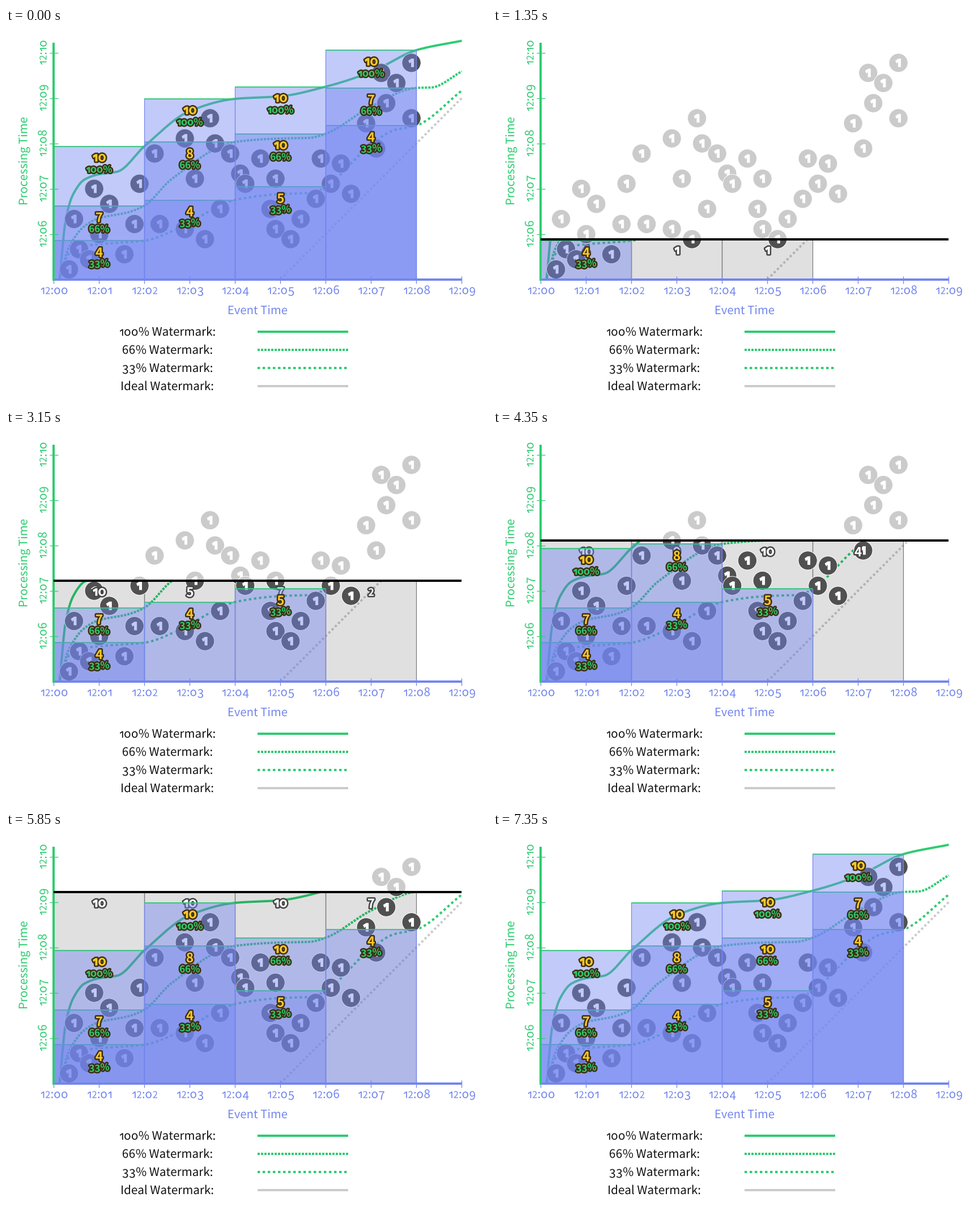
A matplotlib script for the animation above (8 s loop, 849x660 px).

```python
from itertools import groupby

import numpy as np
import matplotlib.pyplot as plt
from matplotlib.animation import FuncAnimation
from matplotlib.collections import PatchCollection
from matplotlib.patches import Circle, PathPatch, Rectangle
from matplotlib.path import Path
from matplotlib.patheffects import withStroke
from matplotlib.textpath import TextPath
from matplotlib.transforms import Affine2D

W, H = 849, 660
X0, Y0 = 84, 443.2          # corner of the chart
UNIT = 80 / 9               # one step of the sweep, in pixels
SPAN = 18                   # steps in a window
COL = SPAN * UNIT
LAST = 49
PX = 0.72                   # points per pixel at 100 dpi

GREEN, BLUE, GREY = "#2ecc71", "#7386ee", "#cbcbcb"
DARK, BROWN, GOLD = "#505050", "#3d2f12", "#ffc926"

SOLID = "-"
FINE = (0, (1, 0.5))
COARSE = (0, (1.1, 1.15))
DOTS = (0, (1, 1))

# the plotted events, (event time, processing time) in steps
EVENTS = [
    (3, 2), (5, 6), (7, 4), (14, 5), (9, 9),
    (16, 11), (4, 12), (11, 15), (8, 18), (17, 19),
    (30, 8), (26, 10), (21, 11), (33, 14), (28, 20),
    (20, 25), (35, 25), (32, 27), (26, 28), (31, 32),
    (47, 8), (44, 10), (49, 12), (43, 14), (52, 16),
    (38, 19), (44, 20), (37, 21), (41, 24), (53, 24),
    (59, 17), (55, 19), (57, 23), (64, 26), (62, 31),
    (71, 32), (66, 35), (68, 39), (65, 41), (71, 43),
]

# key points of each watermark; windows and counts follow from them
WATERMARKS = [
    ("33%", COARSE, [(94, 443), (110, 398), (130, 386), (164, 381), (244, 374.8),
                     (300, 355), (404, 303), (484, 292.5), (540, 290.5),
                     (564, 279.5), (644, 205), (684, 180), (724, 171.5), (804, 110)]),
    ("66%", FINE, [(94, 443), (110, 388), (137, 350), (164, 335), (214, 325),
                   (244, 313), (292, 266), (404, 200.5), (484, 194.5), (534, 193.5),
                   (564, 186), (644, 138), (724, 105.2), (750, 104.5), (804, 76)]),
    ("100%", SOLID, [(94, 443), (105, 337), (118, 293), (138, 267), (164, 257.5),
                     (196, 253), (244, 208), (324, 146), (404, 124.5), (484, 120),
                     (564, 103), (644, 77), (724, 38.5), (804, 22)]),
]

fig = plt.figure(figsize=(W / 100, H / 100), dpi=100, facecolor="white")
ax = fig.add_axes([0, 0, 1, 1])
ax.set_xlim(-0.5, W - 0.5)      # whole numbers are pixel centres
ax.set_ylim(H - 0.5, -0.5)
ax.axis("off")


# ---- lettering with old-style figures, in em units ----

def one(bold):
    w, x, h = (0.17, 0.37, 0.59) if bold else (0.085, 0.28, 0.56)
    pts = [(x, 0), (x, h), (x - 0.9 * w, h), (0, h - 0.14),
           (0.45 * w, h - 0.14 - w), (x - w, h - 1.15 * w), (x - w, 0)]
    return Path(pts + pts[:1], closed=True)


def letters(text, bold):
    font = dict(family="Noto Sans CJK JP", weight="bold" if bold else "normal")
    path = TextPath((0, 0), text, size=100, prop=font)
    return path.transformed(Affine2D().scale(0.01))


def figure(ch, bold):
    if ch == "1":
        return one(bold)
    if ch == "0":
        return letters("o", bold).transformed(Affine2D().scale(1.06 if bold else 1))
    if ch == "2":
        return letters(ch, bold).transformed(Affine2D().scale(0.8))
    drop = -0.15 if ch in "34579" else 0
    return letters(ch, bold).transformed(Affine2D().translate(0, drop))


def lettering(text, bold=False):
    gap = 0.08 if bold else 0.12
    parts, x = [], 0
    for is_digit, run in groupby(text, str.isdigit):
        run = "".join(run)
        for piece in run if is_digit else [run]:
            g = figure(piece, bold) if is_digit else letters(piece, bold)
            box = g.get_extents()
            parts.append(g.transformed(Affine2D().translate(x - box.x0, 0)))
            x += box.width + gap
    return Path.make_compound_path(*parts)


def place(path, size, x, y, turn=0, mid=False):
    """Centre on x, with y as the baseline or the middle."""
    box = path.get_extents()
    cy = (box.y0 + box.y1) / 2 if mid else 0
    move = Affine2D().translate(-(box.x0 + box.x1) / 2, -cy)
    return path.transformed(move.scale(size, -size).rotate_deg(turn).translate(x, y))


def write(text, size, x, y, color, turn=0):
    path = place(lettering(text), size, x, y, turn)
    ax.add_patch(PathPatch(path, fc=color, lw=0))


def badge(path, color, edge, z):
    """Bold text with a heavy outline."""
    return ax.add_patch(PathPatch(
        path, fc=color, ec="none", lw=0, zorder=z, joinstyle="round",
        path_effects=[withStroke(linewidth=5 * PX, foreground=edge)]))


def line(xs, ys, color, width, z, style=SOLID):
    return ax.plot(xs, ys, color=color, lw=width * PX, ls=style, zorder=z,
                   solid_capstyle="butt", dash_capstyle="butt")[0]


def smooth(keys):
    """Monotone cubic through the keys, with harmonic-mean slopes."""
    kx, ky = np.array(keys, float).T
    s = np.diff(ky) / np.diff(kx)
    m = np.r_[s[0], 2 * s[:-1] * s[1:] / (s[:-1] + s[1:]), s[-1]]
    x = np.linspace(kx[0], kx[-1], 1421)
    k = np.clip(np.searchsorted(kx, x, "right") - 1, 0, len(s) - 1)
    d = kx[k + 1] - kx[k]
    u = (x - kx[k]) / d
    rise = u * u * (3 - 2 * u)
    y = (ky[k] + (ky[k + 1] - ky[k]) * rise
         + d * u * (1 - u) * (m[k] * (1 - u) - m[k + 1] * u))
    return x, y


def arrived(c, step):
    """Number of events of window c seen before a step."""
    return sum(i // SPAN == c and j < step for i, j in EVENTS)


# ---- fixed parts ----

def draw_axes():
    for i in range(10):
        x = X0 + 80 * i
        line([x, x], [437, 450], BLUE, 1.3, 8)
        write(f"12:0{i}", 20.6, x + 0.5, 469, BLUE)
    for i in range(6, 11):
        y = 443 - 80 * (i - 5)
        line([77, 92], [y, y], GREEN, 1.3, 8)
        write(f"12:{i:02d}", 20.6, 71, y, GREEN, -90)
    line([X0, 805], [443, 443], BLUE, 4, 8)
    line([X0, X0], [25, 445], GREEN, 4, 8.1)
    write("Event Time", 20.3, 444, 504.5, BLUE)
    write("Processing Time", 20.4, 37, 234, GREEN, -90)


def draw_legend():
    rows = [("100%", GREEN, SOLID), ("66%", GREEN, FINE),
            ("33%", GREEN, COARSE), ("Ideal", GREY, SOLID)]
    for n, (name, color, style) in enumerate(rows):
        y = 535.5 + 32 * n
        write(f"{name} Watermark:", 20.6, 284.3, y + 7, "#111111")
        line([444, 604], [y, y], color, 4, 1, style)


def draw_events(color, z):
    shapes = []
    for i, j in sorted(EVENTS, key=lambda e: -e[1]):
        x, y = X0 + i * UNIT, Y0 - j * UNIT
        shapes.append(Circle((x, y), 16.6, fc=color, ec="white", lw=0.9 * PX))
        digit = place(one(True), 24, x - 0.5, y, mid=True)
        shapes.append(PathPatch(digit, fc="white", ec="white", lw=PX))
    return ax.add_collection(PatchCollection(shapes, match_original=True, zorder=z))


# ---- parts that follow the sweep ----

draw_axes()
draw_legend()
draw_events(GREY, 2.5)
sweep = line([X0, 804], [Y0, Y0], "black", 4, 9)
swept = [draw_events(DARK, 3),
         line([484, 804], [443, 123], GREY, 4, 1, DOTS)]

digits = [lettering(str(n), True) for n in range(11)]
panels = []
for c in range(4):
    rect = ax.add_patch(Rectangle((X0 + c * COL, Y0), COL, 0, fc=(0, 0, 0, 0.12),
                                  ec="#777777", lw=1.2 * PX, zorder=2))
    panels.append((rect, badge(digits[0], "white", "#444444", 4)))


def add_window(c, top, share, z):
    x = X0 + c * COL
    count = arrived(c, (Y0 - top) / UNIT)
    box = Rectangle((x, top), COL, Y0 - top, fc=(0.45, 0.525, 0.95, 0.436),
                    ec=BLUE, lw=1.2 * PX, zorder=z)
    label = place(lettering(share, True), 17, x + 80, top + 40.5, mid=True)
    number = place(digits[count], 22.5, x + 80, top + 20.5, mid=True)
    return [ax.add_patch(box),
            line([x, x + COL], [top, top], GREEN, 1.6, z + 0.05),
            badge(label, GREEN, BROWN, 7),
            badge(number, GOLD, BROWN, 7.1)]


windows = []
for level, (share, style, keys) in enumerate(WATERMARKS):
    xs, ys = smooth(keys)
    swept.append(line(xs, ys, GREEN, 4, 1, style))
    for c in range(4):
        top = np.interp(X0 + (c + 1) * COL, xs, ys)   # fires at the window's end
        windows.append((top, add_window(c, top, share, 5 + level / 10)))


def draw(n):
    step = min(n // 3, LAST)
    done = step in (0, LAST)
    y = 0 if done else Y0 - (step - 1) * UNIT

    sweep.set_visible(not done)
    sweep.set_ydata([y, y])
    below = Rectangle((0, H), W, y - H, transform=ax.transData)
    for art in swept:
        art.set_clip_path(below)

    for c, (rect, label) in enumerate(panels):
        count = arrived(c, step)
        shown = count > 0 and not done
        rect.set_visible(shown)
        label.set_visible(shown)
        rect.set_y(y)
        rect.set_height(Y0 - y)
        label.set_path(place(digits[count], 22.5, X0 + (c + 0.5) * COL, y + 20, mid=True))

    for top, parts in windows:
        for art in parts:
            art.set_visible(y < top)
    return []


anim = FuncAnimation(fig, draw, frames=160, interval=50, repeat=True,
                     repeat_delay=0, init_func=lambda: draw(0), blit=False)
plt.show()
```
